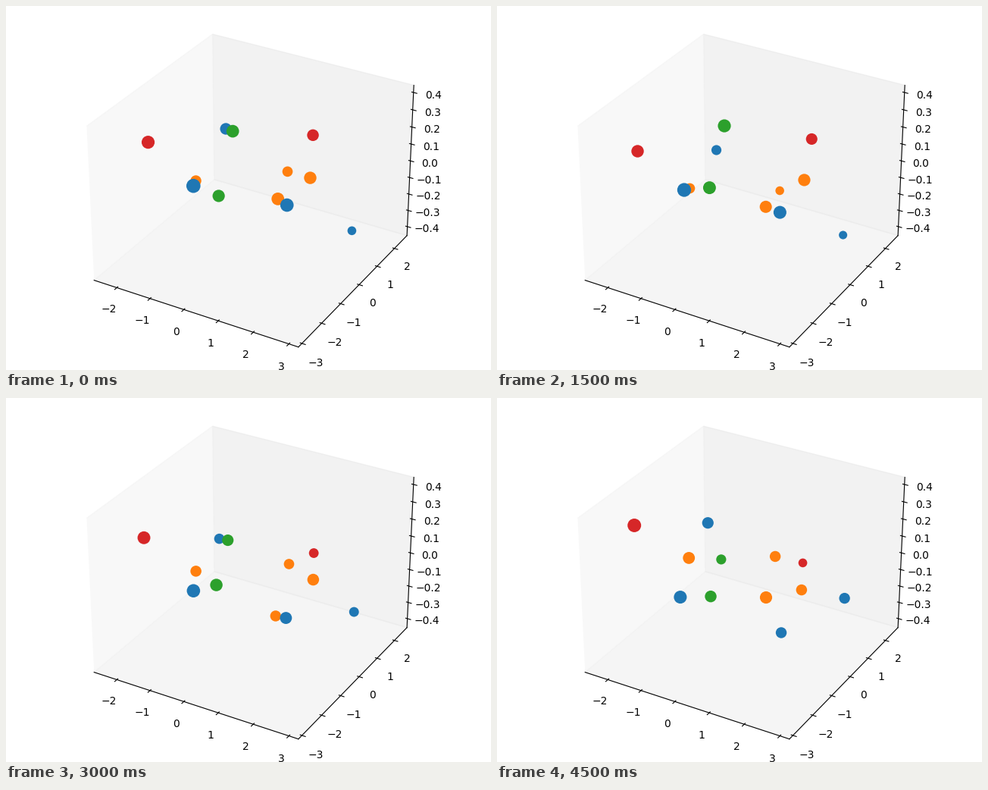
Animation, 640 px wide and 480 px high, one loop 5 s. Source, as a matplotlib script:

```python
import numpy as np
import matplotlib.pyplot as plt
from matplotlib.animation import FuncAnimation

W, H, DPI = 640, 480, 100
STEPS = 10
HYDROGEN, CARBON, NITROGEN, OXYGEN = "C0", "C1", "C2", "C3"

# The molecule's plane on the stage, in pixels with y down.
CENTER = np.array([327, 234])
AXIS_A = np.array([-75, -12])
AXIS_B = np.array([9.8, -45])

fig = plt.figure(figsize=(W / DPI, H / DPI), dpi=DPI)

box = fig.add_axes([0, 0, 1, 1], projection="3d")
box.grid(False)
box.set_xticks(np.arange(-2, 4))
box.set_yticks(np.arange(-3, 3))
box.set_zticks(np.arange(-4, 5) / 10)
box.set_xlim(-2.694, 3.265)
box.set_ylim(-3.176, 2.739)
box.set_zlim(-0.4555, 0.4415)

stage = fig.add_axes([0, 0, 1, 1])
stage.set_xlim(0, W)
stage.set_ylim(H, 0)
stage.axis("off")

rng = np.random.default_rng(4)
time = np.arange(STEPS) / STEPS
atoms = []


def atom(color, site, reach, lift, swing, turns, phase):
    """Put an atom on one of six spokes; it bobs around its lift."""
    a = np.radians(60 * site)
    rest = CENTER + reach * (np.cos(a) * AXIS_A + np.sin(a) * AXIS_B)
    height = lift + swing * np.cos(2 * np.pi * turns * time
                                   - np.radians(phase))
    x = rest[0] + rng.normal(0, 3, STEPS)
    atoms.append((rest[1], color, x, rest[1] - height, height))


# Ring
atom(CARBON, 0, 1, -2, 16, 4, 248)
atom(NITROGEN, 1, 1, 5, 29, 4, 48)
atom(CARBON, 2, 1, -23, 19, 1, 289)
atom(CARBON, 3, 1, -2, 22, 3, 354)
atom(CARBON, 4, 1, 10, 18, 1, 33)
atom(NITROGEN, 5, 1, 15, 13, 4, 81)

# Outer atoms
atom(OXYGEN, 0, 1.9, 34, 14, 4, 262)
atom(HYDROGEN, 1, 1.5, -14, 22, 2, 330)
atom(OXYGEN, 2, 1.75, -16, 25, 4, 26)
atom(HYDROGEN, 3, 1.75, -28, 20, 4, 230)
atom(HYDROGEN, 4, 1.5, 8, 32, 3, 11)
atom(HYDROGEN, 5, 1.75, 42, 13, 0.5, 0)

atoms.sort(key=lambda entry: entry[0])      # back to front
_, colors, xs, ys, heights = zip(*atoms)
xs, ys, heights = map(np.array, (xs, ys, heights))

# Higher atoms are larger; px^2 to pt^2.
areas = (225 + 2.2 * heights) * (72 / DPI) ** 2

dots = stage.scatter(xs[:, 0], ys[:, 0], c=colors, linewidths=0)


def update(step):
    dots.set_offsets(np.column_stack([xs[:, step], ys[:, step]]) + 0.5)
    dots.set_sizes(areas[:, step])
    return [dots]


anim = FuncAnimation(fig, update, frames=STEPS, interval=500, repeat=True,
                     repeat_delay=0, init_func=lambda: update(0))
plt.show()
```
